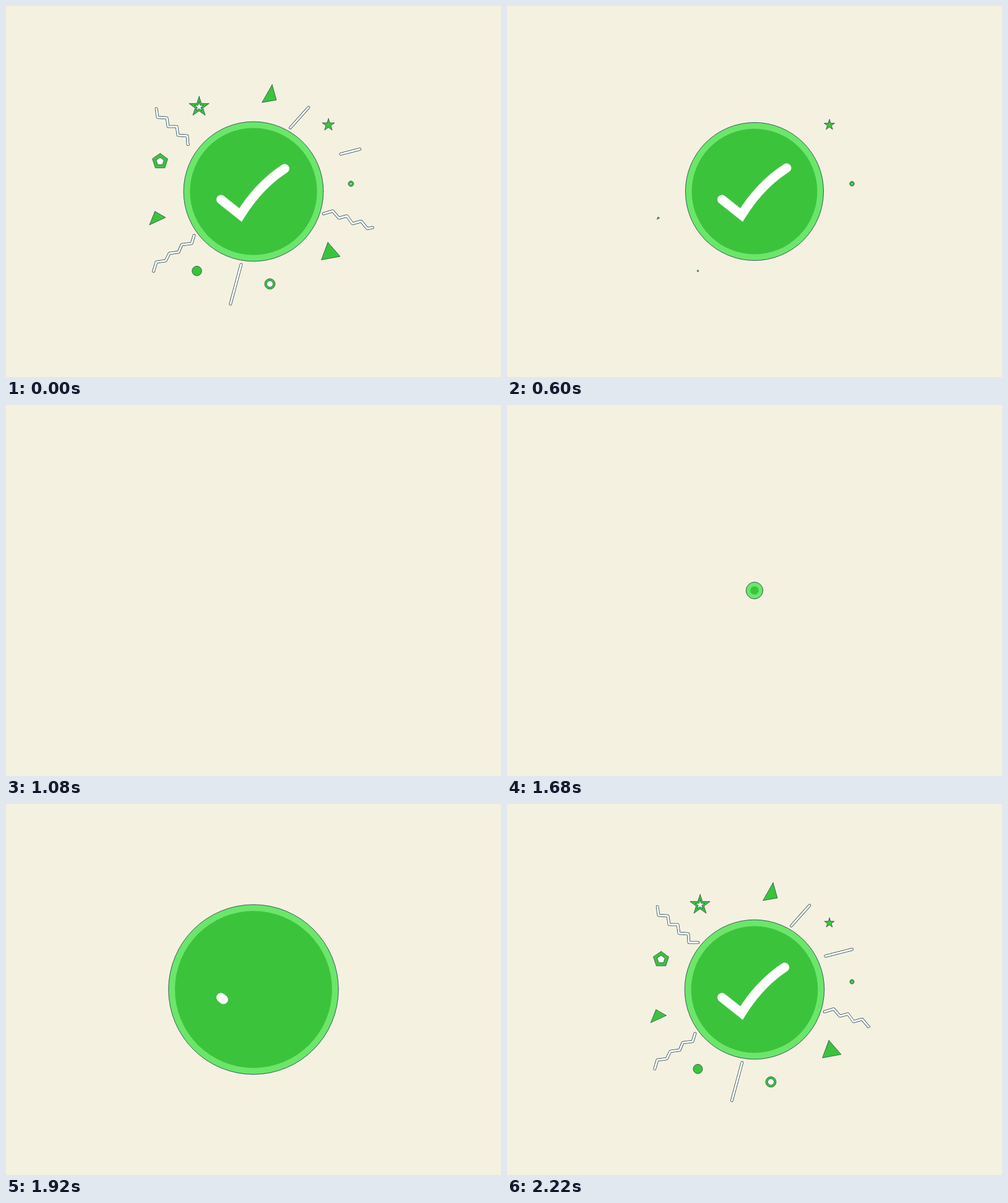
Write an HTML page with a canvas that moves like this. It is 800 px wide and 600 px high and loops after 2250 ms.

```html
<!DOCTYPE html>
<html lang="en">
<head>
<meta charset="utf-8">
<title>Success</title>
<style>
html, body { margin: 0; width: 100%; height: 100%; overflow: hidden; background: #f5f1e0; }
canvas { display: block; width: 100%; height: 100%; }
</style>
</head>
<body>
<canvas id="stage" width="800" height="600"></canvas>
<script>
const ctx = document.getElementById('stage').getContext('2d');
const LOOP = 2250, STEP = 30;
const BG = '#f5f1e0', GREEN = '#3cc33c', LIGHT = '#6be66b', EDGE = '#143c46';

const clamp = u => Math.min(1, Math.max(0, u));
const easeOut = u => 1 - (1 - clamp(u)) ** 3;
const progress = (t, start, span) => easeOut((t - start) / span);

// Part of a polyline between the fractions a and b of its length.
function trim(pts, a, b) {
  const lens = pts.slice(1).map((p, i) => Math.hypot(p[0] - pts[i][0], p[1] - pts[i][1]));
  const total = lens.reduce((s, l) => s + l, 0);
  const from = a * total, to = b * total;
  const out = [];
  let pos = 0;
  lens.forEach((len, i) => {
    const lo = Math.max(from, pos), hi = Math.min(to, pos + len);
    if (hi > lo) {
      const at = d => {
        const k = (d - pos) / len;
        return [0, 1].map(j => pts[i][j] + (pts[i + 1][j] - pts[i][j]) * k);
      };
      if (!out.length) out.push(at(lo));
      out.push(at(hi));
    }
    pos += len;
  });
  return out;
}

function trace(pts) {
  ctx.beginPath();
  pts.forEach(p => ctx.lineTo(p[0], p[1]));
}

function strokeTrim(pts, a, b, layers, join) {
  if (b - a < 0.002) return;
  trace(trim(pts, a, b));
  ctx.lineCap = 'round';
  ctx.lineJoin = join;
  for (const [color, width] of layers) {
    ctx.strokeStyle = color;
    ctx.lineWidth = width;
    ctx.stroke();
  }
}

// Streamers: path, start of drawing, start of erasing.
const streamers = [
  { pts: [[459.5, 197], [489, 164]], on: 1992, off: 2256 },
  { pts: [[309, 224], [294, 224], [293, 210], [278, 209], [276, 195], [262, 195], [260, 181], [245, 180], [243, 166]], on: 1989, off: 2240 },
  { pts: [[304, 371], [300, 384], [284, 386], [279, 398], [264, 400], [258, 412], [243, 414], [238.5, 429]], on: 2032, off: 2283 },
  { pts: [[380, 418], [362.5, 483]], on: 2075, off: 2326 },
  { pts: [[513, 336], [528, 331.5], [538, 343], [551, 339.5], [560, 352], [574, 348], [584, 360], [598, 357]], on: 2107, off: 2358 }
];
const slider = [[507, 248], [572, 231.5]];
const thin = [[EDGE, 4.6], ['#fff', 3.1]];

function drawStreamers(t) {
  for (const s of streamers) {
    strokeTrim(s.pts, progress(t, s.on, 230), progress(t, s.on, 230), thin, 'round');
    strokeTrim(s.pts, progress(t, s.off, 230), progress(t, s.on, 230), thin, 'round');
  }
  const tail = progress(t, 2213, 170);
  const head = Math.min(1, tail + 0.665 * progress(t, 1895, 200));
  strokeTrim(slider, tail, head, thin, 'round');
}

const polygon = (n, r, inner = 0) => {
  const count = inner ? n * 2 : n;
  return Array.from({ length: count }, (_, i) => {
    const a = i * 2 * Math.PI / count - Math.PI / 2, d = inner && i % 2 ? inner : r;
    return [d * Math.cos(a), d * Math.sin(a)];
  });
};
const star = r => polygon(5, r, r * 0.39);
const disc = r => polygon(32, r);

// Confetti: centre, outline around it, optional hole, order of appearance.
const confetti = [
  { x: 426, y: 142, pts: [[4, -15], [11, 10], [-12, 14]], order: 0 },
  { x: 426.5, y: 449.5, pts: disc(8.4), hole: disc(5), order: 0 },
  { x: 312, y: 163, pts: star(17), hole: star(7.8), order: 1 },
  { x: 249, y: 251.3, pts: polygon(5, 13), hole: polygon(5, 6.6), order: 1 },
  { x: 524, y: 398, pts: [[-4, -16], [16, 7], [-14, 12.5]], order: 1 },
  { x: 244.5, y: 343, pts: [[-4, -11], [13.5, -1], [-12.5, 11]], order: 2 },
  { x: 308.5, y: 428.5, pts: disc(7.8), order: 2 },
  { x: 521, y: 192.3, pts: star(12.4), order: 3 },
  { x: 557.5, y: 287.5, pts: disc(5.2), hole: disc(2), order: 3 }
];

function drawConfetti(t) {
  for (const c of confetti) {
    const start = 1929 + c.order * 75;
    const k = progress(t, start, 210) - progress(t, start + 675, 210);
    if (k < 0.02) continue;
    const scaled = pts => pts.map(p => [c.x + p[0] * k, c.y + p[1] * k]);
    const fill = (pts, color) => {
      trace(scaled(pts));
      ctx.closePath();
      ctx.fillStyle = color;
      ctx.fill();
      ctx.strokeStyle = EDGE;
      ctx.lineWidth = 0.7;
      ctx.lineJoin = 'miter';
      ctx.stroke();
    };
    fill(c.pts, GREEN);
    if (c.hole) fill(c.hole, '#fff');
  }
}

// Straight growth, then a decaying wobble, finally a straight shrink.
function badgeScale(t) {
  const s = (t - 1824) / 1000;
  const wobble = s > 0 ? 0.54 * Math.exp(-8.8 * s) * Math.sin(2 * Math.PI * s / 0.357) : 0;
  return (clamp((t - 1660) / 164) + wobble) * (1 - clamp((t - 3159) / 164));
}

function circle(r) {
  ctx.beginPath();
  ctx.arc(400, 300, Math.max(0, r), 0, 2 * Math.PI);
}

const curve = Array.from({ length: 41 }, (_, i) => {
  const u = i / 40, v = 1 - u;
  return [
    v * v * 379 + 2 * u * v * 409.5 + u * u * 452,
    v * v * 338 + 2 * u * v * 289 + u * u * 262
  ];
});
const check = [[347.5, 313], ...curve];

function drawBadge(t) {
  const outer = 111.6 * badgeScale(t);
  if (outer < 0.3) return;
  circle(outer);
  ctx.fillStyle = LIGHT;
  ctx.fill();
  ctx.strokeStyle = EDGE;
  ctx.lineWidth = 0.8;
  ctx.stroke();
  circle(Math.min(outer, 101.5 * badgeScale(t - 9)));
  ctx.fillStyle = GREEN;
  ctx.fill();

  ctx.save();
  circle(outer);
  ctx.clip();
  strokeTrim(check, progress(t, 3065, 435), progress(t, 1915, 435), [['#fff', 15]], 'miter');
  ctx.restore();
}

function draw(now) {
  const phase = Math.floor(now % LOOP / STEP) * STEP;
  // The loop begins in mid-burst, so the early part follows the late part.
  const t = phase < 1400 ? phase + LOOP : phase;
  ctx.fillStyle = BG;
  ctx.fillRect(0, 0, 800, 600);
  drawStreamers(t);
  drawBadge(t);
  drawConfetti(t);
}

let origin = null;
function tick(now) {
  if (origin === null) origin = now;
  draw(Math.max(0, now - origin));
  requestAnimationFrame(tick);
}
draw(0);
requestAnimationFrame(tick);
</script>
</body>
</html>
```
